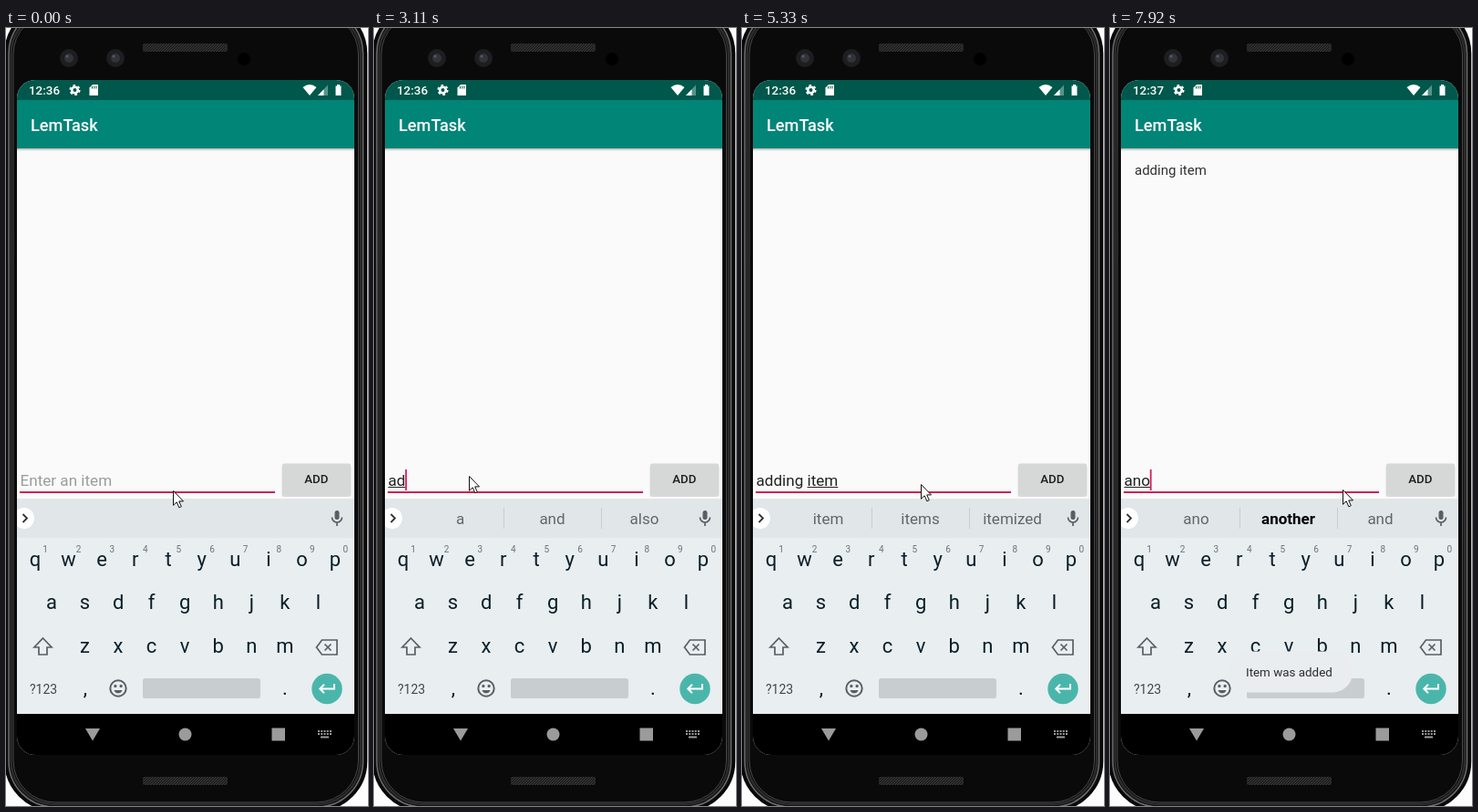
An HTML page for the animation above (8 s loop, 397 px wide and 853 px high).

```html
<!DOCTYPE html>
<html lang="en">
<head>
<meta charset="utf-8">
<style>
html, body { margin: 0; width: 100%; height: 100%; overflow: hidden; background: #fdfdfd; }
svg { position: absolute; left: 0; top: 0; }
text { font-family: Roboto, sans-serif; white-space: pre; }
.mid { text-anchor: middle; }
.key { font-size: 22px; fill: #0b1f29; }
.num { font-size: 10px; fill: #6c7378; }
.sug { font-size: 17px; fill: #60676b; }
.bold { font-weight: 700; fill: #000; }
</style>
</head>
<body>
<svg width="397" height="853" viewBox="0 0 397 853">
  <defs>
    <clipPath id="screen"><rect x="12" y="57" width="370" height="740" rx="20"/></clipPath>
    <linearGradient id="shade" x2="0" y2="1">
      <stop stop-opacity=".28"/><stop offset="1" stop-opacity="0"/>
    </linearGradient>
    <pattern id="mesh" width="3" height="3" patternUnits="userSpaceOnUse">
      <rect width="3" height="3" fill="#303030"/><path d="M0 3L3 0" stroke="#161616"/>
    </pattern>
  </defs>

  <!-- phone body -->
  <g fill="none">
    <rect x="-1" y="-26" width="396.500" height="884" rx="54" fill="#0a0a0a" stroke="#000" stroke-width="1.500"/>
    <rect x="3" y="-22" width="388.500" height="876" rx="50" stroke="#6e6e6e" stroke-width="1.500"/>
    <rect x="5.500" y="-19" width="383.500" height="870" rx="48" stroke="#2c2c2c" stroke-width="2.500"/>
    <rect x="8" y="-17" width="378.500" height="866" rx="46" stroke="#484848"/>
  </g>
  <g fill="url(#mesh)">
    <rect x="150" y="17" width="93" height="9" rx="2"/>
    <rect x="150" y="821" width="93" height="9" rx="2"/>
  </g>
  <g fill="#1d1e20">
    <circle cx="69" cy="33" r="10"/><circle cx="120" cy="33" r="10"/>
    <circle cx="261" cy="34" r="7" fill="#000"/>
  </g>
  <g fill="#30343a">
    <circle cx="69" cy="33" r="5"/><circle cx="120" cy="33" r="5"/>
    <circle cx="67" cy="31" r="1.500" fill="#565b62"/><circle cx="118" cy="31" r="1.500" fill="#565b62"/>
  </g>

  <g clip-path="url(#screen)">
    <rect x="12" y="57" width="370" height="740" fill="#fafafa"/>
    <rect x="12" y="132" width="370" height="3" fill="url(#shade)"/>
    <rect x="12" y="57" width="370" height="22" fill="#00574b"/>
    <rect x="12" y="79" width="370" height="53" fill="#008577"/>

    <!-- status bar -->
    <g fill="#fff">
      <text id="clock" x="25" y="73" font-size="13.4" font-weight="500"></text>
      <circle cx="75.500" cy="68" r="3.300" fill="none" stroke="#fff" stroke-width="2.600"/>
      <circle cx="75.500" cy="68" r="5.200" fill="none" stroke="#fff" stroke-width="1.800" stroke-dasharray="2.720"/>
      <path d="M95 62h6v12H91.500V65.500z"/>
      <path d="M94.500 64v2.500M96.800 63.500v3M99 63.500v3" stroke="#00574b" stroke-width="1"/>
      <path d="M325.500 65Q333 59 340.500 65L333 74z"/>
      <path d="M353 62.500V74H342z" opacity=".35"/><path d="M348.500 67.200V74H342z"/>
      <path d="M361.500 63.500h1.500V62h3v1.500h1.500V74h-6z"/>
      <text x="27" y="113" font-size="18.2" font-weight="500">LemTask</text>
    </g>

    <text id="item" x="27" y="161" font-size="15" fill="#303030">adding item</text>

    <!-- entry row -->
    <text id="entry" x="15.500" y="502" font-size="17.1"></text>
    <rect id="under" y="503" height="1" fill="#222"/>
    <rect x="15" y="508" width="280" height="2" fill="#d0234f"/>
    <rect id="caret" y="484" width="1.800" height="23" fill="#d81b60"/>
    <rect x="302.500" y="479" width="76" height="35" rx="2.500" opacity=".13"/>
    <rect id="button" x="303" y="477.500" width="75" height="34.500" rx="2"/>
    <text class="mid" x="340.300" y="499" font-size="13.300" font-weight="500" fill="#202020">ADD</text>

    <!-- keyboard -->
    <rect x="12" y="516" width="370" height="43" fill="#e1e6e9"/>
    <rect x="12" y="559" width="370" height="193" fill="#e9eef1"/>
    <circle cx="19.500" cy="537.500" r="11.500" fill="#fff"/>
    <path d="M18.500 533l4.500 4.500-4.500 4.500" fill="none" stroke="#333" stroke-width="1.800"/>
    <g id="strip"><path d="M142.500 526v23M249.500 526v23" stroke="#c6cccf"/></g>
    <g fill="none" stroke="#586066" stroke-width="1.700">
      <rect x="360.500" y="529" width="5" height="10" rx="2.500" fill="#586066" stroke="none"/>
      <path d="M357.500 536.500a5.500 5.500 0 0 0 11 0M363 542v4"/>
      <path d="M40.500 669L50 679h-5v8h-9v-8h-5z"/>
      <path d="M346.500 671H363v16h-16.500l-6-8zM349.500 675.500l7 7m0-7l-7 7"/>
      <circle cx="123" cy="724" r="8.700" stroke-width="2"/>
      <path d="M118.500 726h9a4.700 4.700 0 0 1-9 0z" fill="#586066" stroke="none"/>
      <path d="M118.500 721.500h2.800M124.700 721.500h2.800" stroke-width="2.800"/>
    </g>
    <g id="keys"></g>
    <text x="26" y="729.500" font-size="14" fill="#3d474d">?123</text>
    <rect x="150" y="713" width="129" height="22" rx="2.500" fill="#c8cdd0"/>
    <circle cx="352" cy="724.500" r="16.700" fill="#4ab6ab"/>
    <path d="M360 719v5.500H344.500m4.500-4.700l-4.700 4.700 4.700 4.700" fill="none" stroke="#fff" stroke-width="2"/>

    <g id="toast">
      <rect x="129" y="683.500" width="137" height="45" rx="22" fill="#e9edef"/>
      <text x="149" y="711" font-size="13.400" fill="#2c2c2c">Item was added</text>
    </g>

    <!-- navigation bar -->
    <rect x="12" y="752" width="370" height="46"/>
    <g fill="#9b9b9b">
      <path d="M87 768h16l-8 13.500z"/><circle cx="196.500" cy="774.500" r="7"/>
      <rect x="291.500" y="767.500" width="14.500" height="14"/>
      <path d="M342 771h15M342 774h15" stroke="#9b9b9b" stroke-width="2" stroke-dasharray="2 1.250"/>
      <rect x="345" y="776.500" width="9" height="2"/>
    </g>
  </g>

  <path id="mouse" d="M.5 .5V16.300L4.200 12.800L6.800 18.800L9.300 17.700L6.700 11.900H11.500z" fill="#fff" stroke="#111"/>
</svg>

<script>
const LOOP = 8000;
const $ = id => document.getElementById(id);

function addText(parent, x, y, cls, value = '') {
  const node = document.createElementNS('http://www.w3.org/2000/svg', 'text');
  node.setAttribute('x', x);
  node.setAttribute('y', y);
  node.setAttribute('class', cls);
  node.textContent = value;
  return parent.appendChild(node);
}

// Letter rows: characters, first centre, baseline
for (const [row, x, y] of [['qwertyuiop', 32, 590], ['asdfghjkl', 50, 637], ['zxcvbnm', 86.5, 685]])
  [...row].forEach((c, i) => addText($('keys'), x + 36.55 * i, y, 'mid key', c));
[...'1234567890'].forEach((c, i) => addText($('keys'), 43 + 36.6 * i, 575, 'mid num', c));
addText($('keys'), 87, 731, 'mid key', ',');
addText($('keys'), 306, 731, 'mid key', '.');

const words = [94.5, 195.5, 296.5].map(x => addText($('strip'), x, 544, 'mid sug'));

// Tracks hold [start ms, value]; each value lasts until the next start
const mouse = [[0, [183, 507]], [1730, [150, 471]], [1860, [103, 480]], [2010, [99, 500]],
  [2310, [102, 495]], [2430, [104, 491]], [5180, [122, 491]], [5330, [196, 500]],
  [5450, [293, 506]], [5600, [316, 504]], [5720, [307, 502]], [5870, [306, 503]],
  [6690, [290, 505]], [6810, [273, 506]], [6960, [262, 506]], [7090, [255, 506]]];
const caret = [[0, 0], [430, 1], [860, 0], [1300, 1], [1730, 0], [2160, 1], [2830, 0], [2960, 1],
  [5330, 0], [5720, 1], [6540, 0], [7090, 1]];
// finished text | word being composed
const typed = [[0, '|'], [2960, '|a'], [3110, '|ad'], [3390, '|add'], [3520, '|addi'],
  [3670, '|adding'], [3800, 'adding |'], [4230, 'adding |i'], [4510, 'adding |it'],
  [4780, 'adding |item'], [6140, '|'], [7520, '|a'], [7800, '|an'], [7920, '|ano']];
// a star marks the bold word
const hints = [[0, ''], [3110, 'a and also'], [3240, 'ad add and'], [3520, 'add added adding'],
  [3800, ''], [4230, 'i *I it'], [4630, 'it its items'], [4780, 'item items itemized'],
  [6420, ''], [7650, 'a and also'], [7800, 'an and any'], [7920, 'ano *another and']];
const toast = [[0, 0], [6270, .08], [6420, .3], [6540, .6], [6690, .85], [6810, 1]];

const at = (track, t) => track.findLast(([start]) => start <= t)[1];
const show = (id, on) => $(id).setAttribute('opacity', +on);

function draw(t) {
  $('mouse').setAttribute('transform', `translate(${at(mouse, t)})`);
  $('clock').textContent = t < 6140 ? '12:36' : '12:37';
  $('button').setAttribute('fill', t >= 5870 && t < 6140 ? '#c3c4c4' : '#d6d7d7');
  show('item', t >= 6420);
  show('toast', at(toast, t));

  const [done, word] = at(typed, t).split('|');
  const entry = $('entry'), text = done + word;
  const pressed = t >= 2160 && t < 2430;
  entry.textContent = text || 'Enter an item';
  entry.setAttribute('fill', text ? '#222' : pressed ? '#767676' : '#9b9b9b');
  const width = n => n ? entry.getSubStringLength(0, n) : 0;
  const end = width(text.length), start = width(done.length);
  $('under').setAttribute('x', 15.5 + start);
  $('under').setAttribute('width', end - start);
  $('caret').setAttribute('x', 15.3 + end);
  show('caret', at(caret, t));

  const list = at(hints, t);
  show('strip', list !== '');
  words.forEach((node, i) => {
    const value = list.split(' ')[i] || '';
    node.textContent = value.replace('*', '');
    node.classList.toggle('bold', value[0] === '*');
  });
}

function tick() {
  draw(performance.now() % LOOP);
  requestAnimationFrame(tick);
}
tick();
</script>
</body>
</html>
```
